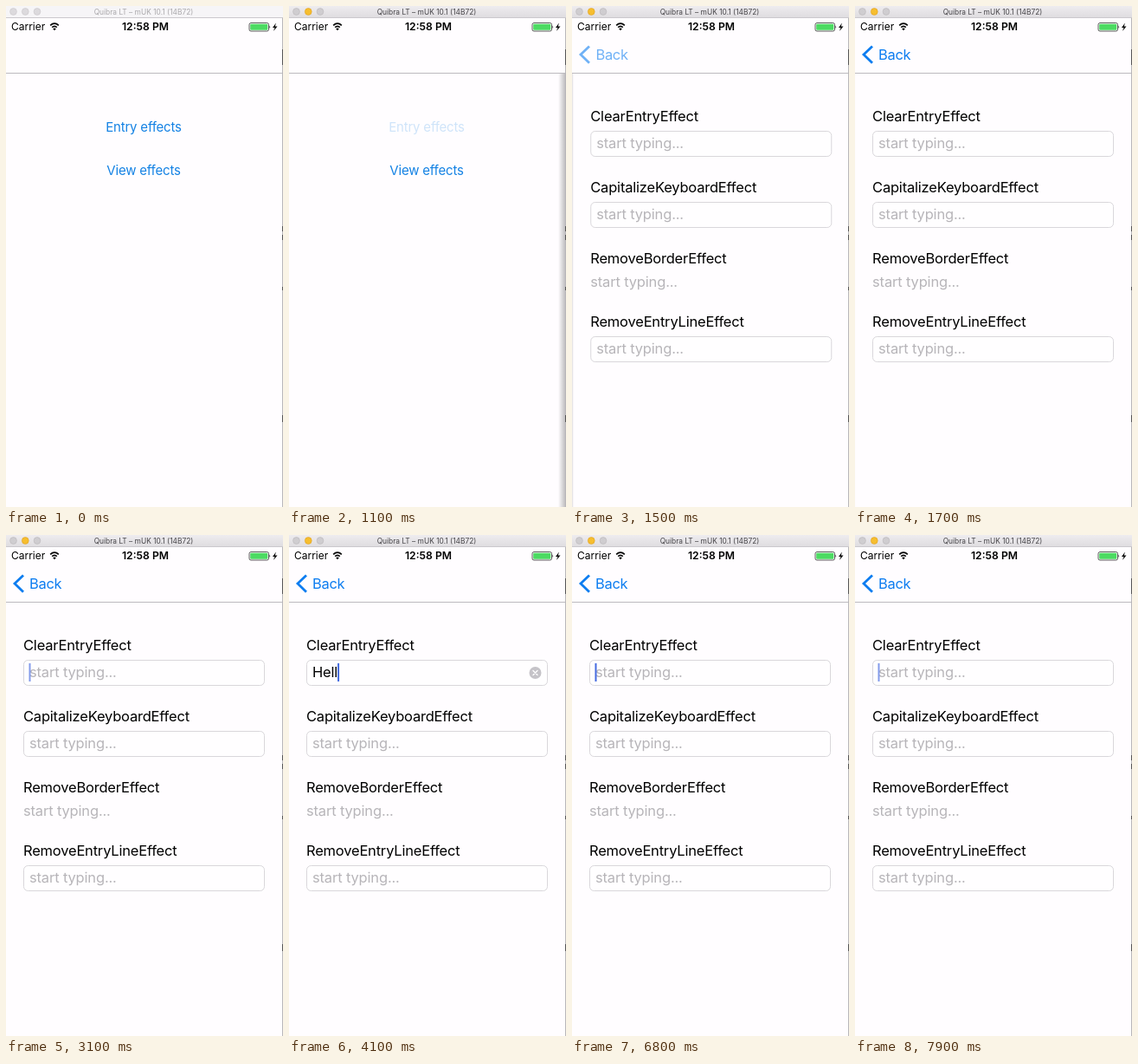
These frames come from a looping animation (320x578 px, 8000 ms). An HTML page:

```html
<!DOCTYPE html>
<html lang="en">
<head>
<meta charset="utf-8">
<title>Entry effects</title>
<style>
  html, body { margin: 0; width: 100%; height: 100%; overflow: hidden; background: #fffdff; }
  svg { display: block; width: 320px; height: 578px; font-family: Inter, Roboto, "Liberation Sans", sans-serif; }
  .bar { fill: #f6f5f7; }
  .light { fill: #dcdadd; stroke: #c9c7ca; stroke-width: .6; }
  .title { font-size: 8.4px; fill: #aaa8ab; text-anchor: middle; }
  .active .bar { fill: url(#barFill); }
  .active .light { fill: #cfcdd0; stroke: #bab8bb; }
  .active .light.mid { fill: #f6be2f; stroke: #dfa023; }
  .active .title { fill: #454347; }
  .status { font-size: 12px; }
  .clock { font-size: 12.2px; font-weight: 600; text-anchor: middle; }
  .button { font-size: 15px; letter-spacing: -.2px; text-anchor: middle; fill: #1482e4; }
  .label, .hint, .typed, .back { font-size: 16.5px; letter-spacing: -.2px; }
  .hint { fill: #b7b5b9; letter-spacing: -.17px; }
  .back { fill: #0d7df0; letter-spacing: -.34px; }
  .paper { fill: #fffdff; }
  .field { fill: #fffeff; stroke: #d9d7db; }
  .line { fill: none; stroke-linecap: round; }
  .cut { fill: none; }
</style>
</head>
<body>
<svg id="stage" viewBox="0 0 320 578">
  <defs>
    <linearGradient id="barFill" x2="0" y2="1">
      <stop stop-color="#eeecef"/><stop offset="1" stop-color="#dfdde0"/>
    </linearGradient>
    <linearGradient id="shade">
      <stop stop-opacity="0"/><stop offset="1" stop-opacity=".28"/>
    </linearGradient>
    <clipPath id="body"><path d="M0 78H320V578H0Z"/></clipPath>
  </defs>
  <rect class="paper" width="320" height="578"/>

  <g clip-path="url(#body)">
    <g id="home">
      <text id="entryButton" class="button" x="159" y="145">Entry effects</text>
      <text class="button" x="159" y="194.500">View effects</text>
    </g>
    <rect id="dim" y="78" width="320" height="500"/>
    <g id="page">
      <rect id="shadow" x="-9" y="78" width="9" height="500" fill="url(#shade)"/>
      <rect class="paper" y="78" width="320" height="500"/>
      <g id="fields"></g>
      <text id="typed" class="typed" x="27" y="164"></text>
      <g id="clear">
        <circle cx="284.500" cy="159" r="7" fill="#c5c3c8"/>
        <path class="line" d="M282 156.500l5 5m0-5l-5 5" stroke="#fff" stroke-width="1.300"/>
      </g>
      <rect id="caret" y="148" width="2" height="21" fill="#456be0"/>
    </g>
  </g>

  <path d="M0 77.500H320" stroke="#bcbabe"/>
  <g id="nav">
    <path class="cut" d="M20 46.500L10 56.100L20 65.700" stroke="#0d7df0" stroke-width="2.800"/>
    <text id="back" class="back" x="27" y="62">Back</text>
  </g>

  <g class="status">
    <text x="6" y="28.300">Carrier</text>
    <text class="clock" x="161" y="28.300">12:58 PM</text>
    <path class="cut" d="M51.200 22.300Q56 18 60.800 22.300M53.200 24.700Q56 22.200 58.800 24.700" stroke="#000" stroke-width="1.700"/>
    <path d="M54.200 26.200Q56 24.900 57.800 26.200L56 28.200Z"/>
    <rect x="281" y="19.500" width="22.500" height="9.500" rx="2" fill="#fff" stroke="#333" stroke-width=".8"/>
    <rect x="282.200" y="20.700" width="20.100" height="7.100" rx="1" fill="#4cdb62"/>
    <path d="M304.500 22.500q1.500 1.700 0 3.400zM312 19.500l-4 5.500h2.500l-1.500 4 4.500-5.500h-2.700z"/>
  </g>

  <rect class="bar" width="320" height="13"/>
  <path d="M0 13.500H320" stroke="#cbc9cd"/>
  <circle class="light" cx="8.500" cy="6.500" r="3.900"/>
  <circle class="light mid" cx="22.300" cy="6.500" r="3.900"/>
  <circle class="light" cx="36" cy="6.500" r="3.900"/>
  <text class="title" x="159" y="9.800">Quibra LT – mUK 10.1 (14B72)</text>

  <path d="M319.500 14V578" stroke="#b8b6b9"/>
  <path d="M319.500 50V68M319.500 254v6m0 4v6M319.500 324v4M319.500 472v8" stroke="#555"/>
</svg>

<script>
const $ = id => document.getElementById(id);
const clamp = v => Math.min(1, Math.max(0, v));

const LOOP = 8000, FRAME = 100;
const PRESS = 1000, PUSH = 1100, FOCUS = 2300, CLEAR = 6800;
const WORD = "Hello", TYPE = 3500, KEY_GAP = 200;

// label, label baseline, has a border
const rows = [
  ["ClearEntryEffect", 133, true],
  ["CapitalizeKeyboardEffect", 215, true],
  ["RemoveBorderEffect", 297, false],
  ["RemoveEntryLineEffect", 370, true]
];
$("fields").innerHTML = rows.map(([name, y, border]) => `
  <text class="label" x="20" y="${y}">${name}</text>
  ${border ? `<rect class="field" x="20.5" y="${y + 11.5}" width="278" height="29" rx="5"/>` : ""}
  <text class="hint" x="${border ? 27 : 20}" y="${y + (border ? 31 : 27)}">start typing...</text>`).join("");
const firstHint = document.querySelector(".hint");

// critically damped spring
function spring(ms) {
  const u = Math.max(0, ms) * 0.01925;
  return 1 - (1 + u) * Math.exp(-u);
}

// caret stays solid after a key, then fades in and out once a second
function blink(ms) {
  const phase = ms % 1000;
  const rise = ms < 1000 ? 1 : clamp((phase + 100) / 300);
  return phase < 400 ? rise : clamp(1 - (phase - 300) / 400);
}

function caretAlpha(t, count) {
  if (t < FOCUS) return 0;
  if (t >= CLEAR) return blink(t - CLEAR);
  if (count) return blink(t - TYPE - (count - 1) * KEY_GAP);
  return blink(t - FOCUS + 300);
}

function render(t) {
  const p = spring(t - PUSH), rest = 1 - p;
  $("stage").classList.toggle("active", t >= PRESS);

  $("home").setAttribute("transform", `translate(${-96 * p})`);
  $("entryButton").style.opacity = t < PRESS ? 1 : 0.2 + 0.8 * clamp((t - PUSH) / 200);
  $("dim").style.opacity = 0.1 * p;
  $("page").setAttribute("transform", `translate(${320 * rest})`);
  $("page").style.display = t < PUSH ? "none" : "";
  $("shadow").style.opacity = rest;

  $("nav").style.opacity = clamp((t - 1265) / 400);
  $("back").setAttribute("x", 27 + 112 * rest);

  const typing = t >= TYPE && t < CLEAR;
  const count = typing ? Math.min(WORD.length, Math.floor((t - TYPE) / KEY_GAP) + 1) : 0;
  const typed = $("typed");
  typed.textContent = WORD.slice(0, count);
  firstHint.style.display = count ? "none" : "";
  $("clear").style.display = count ? "" : "none";
  $("caret").setAttribute("x", 26.5 + (count ? typed.getComputedTextLength() + 0.5 : 0));
  $("caret").style.opacity = caretAlpha(t, count);
}

function tick() {
  const now = (performance.now() + 20) % LOOP;
  render(Math.floor(now / FRAME) * FRAME);
  requestAnimationFrame(tick);
}
tick();
</script>
</body>
</html>
```
